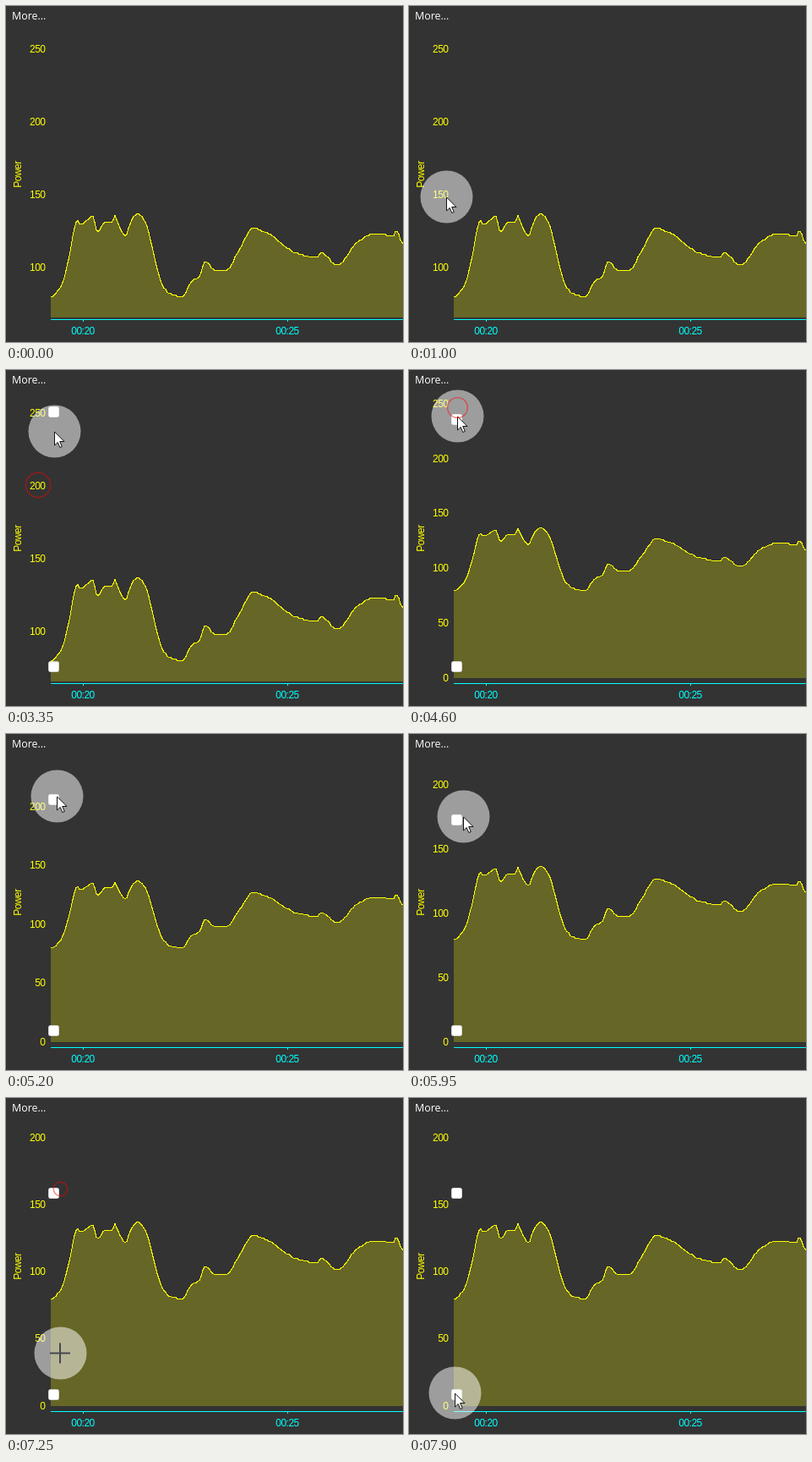
An HTML page that plays this animation: 470x397 px, repeating every 8 s.

```html
<!DOCTYPE html>
<html lang="en">
<head>
<meta charset="utf-8">
<title>Power chart</title>
<style>
  html, body { margin: 0; width: 100%; height: 100%; overflow: hidden; background: #333; }
  svg { display: block; width: 470px; height: 397px; }
  text { font: 12px "Liberation Sans", Arial, sans-serif; letter-spacing: -.5px; fill: #ff0; }
  .menu { font: 12.4px "Open Sans", sans-serif; letter-spacing: 0; fill: #fff; }
  .title { text-anchor: middle; }
  .value { text-anchor: end; }
  .time { fill: #0ff; text-anchor: middle; }
  .axis { stroke: #0ff; fill: none; }
  .handle { fill: #fff; stroke: #d4d4d4; }
  #area, #line { shape-rendering: crispEdges; }
</style>
</head>
<body>
<svg viewBox="0 0 470 397">
  <rect width="470" height="397" fill="#333"/>
  <text class="menu" x="7" y="16">More...</text>
  <text class="title" transform="translate(18 199) rotate(-90)">Power</text>
  <polygon id="area" fill="#ff0" fill-opacity=".25"/>
  <polyline id="line" fill="none" stroke="#ff0"/>
  <path class="axis" d="M53 370.5H470M91.5 371V373M333.5 371V373"/>
  <text class="time" x="91" y="388">00:20</text>
  <text class="time" x="333" y="388">00:25</text>
  <g id="values"></g>
  <g id="handles">
    <rect id="top" class="handle" x="50.5" y="-5.5" width="12" height="12" rx="2"/>
    <rect class="handle" x="50.5" y="344.5" width="12" height="12" rx="2"/>
  </g>
  <g id="pointer">
    <circle cx=".5" r="31" fill="#fff" fill-opacity=".52"/>
    <path id="arrow" d="M.5 .5V16.5L4.2 13 6.8 19 9.3 18 6.7 12H12Z" fill="#fff" stroke="#111"/>
    <path id="cross" d="M-12 0H12M0 -12V12" stroke="#484850" stroke-width="2"/>
  </g>
  <circle id="ring" fill="none" stroke="#f00" stroke-opacity=".5" stroke-width="1.4"/>
</svg>
<script>
const LOOP = 8000, STEP = 50, ENTER = 100, DRAG_START = 4100, DRAG_END = 6900;
const RING_LIFE = 950, HANDLE_HIGH = 49, HANDLE_LOW = 112;
const el = id => document.getElementById(id);
const show = (node, on) => node.style.display = on ? "" : "none";
const clamp = (v, lo, hi) => Math.min(hi, Math.max(lo, v));

const linear = p => p;
const smooth = p => p * p * (3 - 2 * p);
const easeOut = p => 1 - (1 - p) ** 2;

// Turning points of the power curve: x, watts
const knots = [
  [53, 80], [60, 83], [67, 90], [76, 111], [84, 132], [89, 129.5], [103, 135], [108, 125],
  [118, 131], [126, 131.5], [129, 136], [132, 131], [142, 122], [146, 129], [155, 137],
  [163, 133], [187, 86], [198, 81], [209, 80], [219, 90], [229, 94], [236, 104], [248, 97.5],
  [260, 98], [276, 112], [292, 127], [310, 123.5], [345, 109.5], [368, 107], [374, 110],
  [392, 101.5], [416, 117.5], [438, 123.5], [458, 122], [462, 125], [471, 115.5]
];

// Monotone cubic: flat at peaks, harmonic mean of slopes elsewhere.
const slope = i => knots[i + 1] && knots[i] ? (knots[i + 1][1] - knots[i][1]) / (knots[i + 1][0] - knots[i][0]) : 0;
function tangent(i) {
  const a = slope(i - 1), b = slope(i);
  return a * b > 0 ? 2 * a * b / (a + b) : 0;
}
function watts(x) {
  const i = Math.max(0, knots.findIndex(k => k[0] >= x) - 1);
  const [x0, w0] = knots[i], [x1, w1] = knots[i + 1];
  const width = x1 - x0, p = (x - x0) / width, q = 1 - p;
  return w0 + (w1 - w0) * smooth(p) + width * p * q * (tangent(i) * q - tangent(i + 1) * p);
}
const curve = [];
for (let x = 53; x <= 471; x += 2) curve.push([x, Math.round(watts(x))]);

// Each move starts where the previous one ended.
const moves = [
  { from: 100, to: 1000, x: 44, y: 225, ease: easeOut },
  { from: 1000, to: 1850, x: 37, y: 136, ease: smooth },
  { from: 3000, to: 3500, x: 62, y: 55, ease: smooth },
  { from: 3700, to: 3800, x: 57, y: 43, ease: smooth },
  { from: 4100, to: 4600, x: 57, y: 54, ease: linear },
  { from: 4600, to: 5950, x: 64, y: 96.5, ease: linear },
  { from: 5950, to: 6450, x: 64, y: 108, ease: linear },
  { from: 6900, to: 7250, x: 64, y: 301, ease: smooth, bow: 39 },
  { from: 7250, to: 7900, x: 54, y: 348, ease: easeOut }
];
const clicks = [
  { at: 2650, x: 38, y: 136 },
  { at: 4050, x: 57.5, y: 44.5 },
  { at: 6900, x: 64.5, y: 107.5 }
];

function pointerAt(t) {
  let x = 297, y = 415;
  for (const move of moves) {
    if (t < move.from) break;
    const p = move.ease(clamp((t - move.from) / (move.to - move.from), 0, 1));
    x += (move.x - x) * p + (move.bow || 0) * Math.sin(Math.PI * p);
    y += (move.y - y) * p;
  }
  return { x, y };
}

const labels = [0, 50, 100, 150, 200, 250].map(value => {
  const node = document.createElementNS("http://www.w3.org/2000/svg", "text");
  node.setAttribute("class", "value");
  node.setAttribute("x", 46.5);
  node.textContent = value;
  el("values").append(node);
  return { value, node };
});

function drawChart(zero, scale) {
  const points = curve.map(([x, w]) => `${x},${Math.round(zero - w * scale) + .5}`).join(" ");
  const base = Math.min(368, zero);
  el("line").setAttribute("points", points);
  el("area").setAttribute("points", `53,${base} ${points} 471,${base}`);
  for (const { value, node } of labels) {
    const y = zero - value * scale;
    show(node, y > 35 && y < 366);
    node.setAttribute("y", Math.round(y + 4));
  }
}

function drawPointer(t, { x, y }) {
  const dragging = t >= ENTER + 900 && t <= DRAG_END;
  const crossed = !dragging && x > 62.5 && y < 368;
  show(el("pointer"), t >= ENTER);
  show(el("arrow"), !crossed);
  show(el("cross"), crossed);
  el("pointer").setAttribute("transform", `translate(${Math.round(x)} ${Math.round(y) + .5})`);
}

function drawRing(t) {
  const click = clicks.find(c => t >= c.at && t < c.at + RING_LIFE);
  show(el("ring"), click);
  if (!click) return;
  el("ring").setAttribute("cx", click.x);
  el("ring").setAttribute("cy", click.y);
  el("ring").setAttribute("r", 2 + (t - click.at) * .018);
}

function draw(t) {
  const pointer = pointerAt(t);
  const zoomed = t >= DRAG_START;
  const grip = pointerAt(Math.min(t, DRAG_END)).y + 4;
  const top = zoomed ? clamp(grip, HANDLE_HIGH, HANDLE_LOW) : HANDLE_HIGH;
  if (zoomed) drawChart(363.5, 1.252 * Math.exp(.00374 * (top - HANDLE_HIGH)));
  else drawChart(480.5, 1.72);
  show(el("handles"), t >= clicks[0].at);
  el("top").setAttribute("transform", `translate(0 ${Math.round(top)})`);
  drawPointer(t, pointer);
  drawRing(t);
}

const origin = performance.now();
function tick() {
  const t = (performance.now() - origin) % LOOP;
  draw(Math.floor(t / STEP) * STEP);
  requestAnimationFrame(tick);
}
tick();
</script>
</body>
</html>
```
